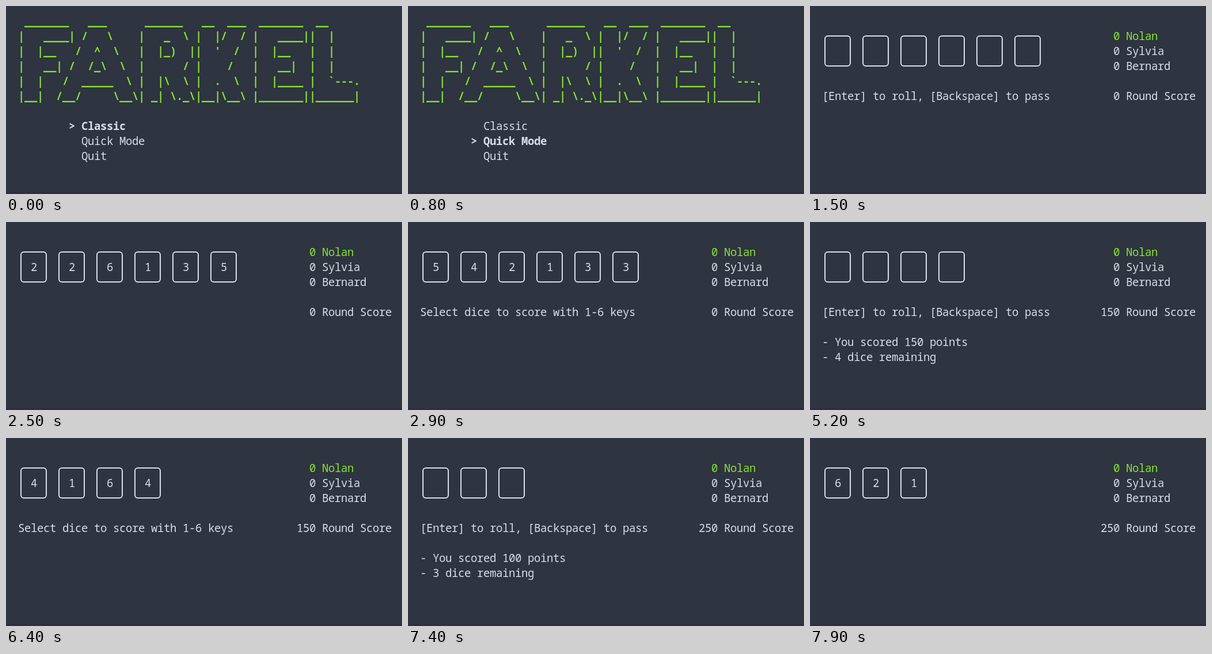
Animation of 688 by 326 pixels, one loop 8 s. Source, as an HTML page:

```html
<!DOCTYPE html>
<html lang="en">
<head>
<meta charset="utf-8">
<title>Farkel</title>
<style>
  html, body { margin: 0; width: 100%; height: 100%; overflow: hidden; background: #2e3440; }
  svg { display: block; }
  text {
    font: 19px "Noto Sans Mono", "DejaVu Sans Mono", monospace;
    fill: #d8dee9;
    white-space: pre;
  }
  rect.die { fill: none; stroke: #d8dee9; stroke-width: 2; }
  text.bold, text.logo { font-weight: 700; }
  text.logo, text.on { fill: #8ae234; }
  rect.on { stroke: #8ae234; }
</style>
</head>
<body>
<svg width="688" height="326" viewBox="0 0 688 326">
  <rect y="322" width="688" height="4" fill="#342d3d"/>
  <g id="menu"></g>
  <g id="game"></g>
</svg>
<script>
const LOOP = 8000, COL = 11, ROW = 26, LEFT = 21, BASE = 33;
const ROLL = 'Select dice to score with 1-6 keys';
const ENTER = '[Enter] to roll, [Backspace] to pass';
const players = ['Nolan', 'Sylvia', 'Bernard'];
const menuItems = ['Classic', 'Quick Mode', 'Quit'];
const logo = [
  ' _______   ___      ______   __  ___  _______  __',
  '|   ____| /   \\    |   _  \\ |  |/  / |   ____||  |',
  '|  |__   /  ^  \\   |  |_)  ||  \'  /  |  |__   |  |',
  '|   __| /  /_\\  \\  |      / |    /   |   __|  |  |',
  '|  |   /  _____  \\ |  |\\  \\ |  .  \\  |  |____ |  `---.',
  '|__|  /__/     \\__\\| _| \\._\\|__|\\__\\ |_______||______|'
];

// roll: number of dice tumbling; dice: settled faces; held: selected dice
const scenes = [
  { at: 0, pick: 0 },
  { at: 800, pick: 1 },
  { at: 1500, dice: '      ', ask: ENTER, score: 0 },
  { at: 2500, roll: 6, score: 0 },
  { at: 2900, dice: '542133', ask: ROLL, score: 0 },
  { at: 4100, dice: '542133', held: [0], ask: ROLL, score: 0 },
  { at: 4600, dice: '542133', held: [0, 3], ask: ROLL, score: 0 },
  { at: 5200, dice: '    ', ask: ENTER, score: 150, won: 150 },
  { at: 6000, roll: 4, score: 150 },
  { at: 6400, dice: '4164', ask: ROLL, score: 150 },
  { at: 7100, dice: '4164', held: [1], ask: ROLL, score: 150 },
  { at: 7400, dice: '   ', ask: ENTER, score: 250, won: 100 },
  { at: 7800, roll: 3, score: 250 },
  { at: 7900, dice: '621', score: 250 }
];

const menu = document.getElementById('menu');
const game = document.getElementById('game');

function add(parent, tag, attrs) {
  const el = document.createElementNS('http://www.w3.org/2000/svg', tag);
  for (const key in attrs) el.setAttribute(key, attrs[key]);
  parent.appendChild(el);
  return el;
}

// One character per terminal cell
function write(parent, col, row, str, cls = '') {
  const x = Array.from(str, (_, i) => LEFT + (col + i) * COL).join(' ');
  add(parent, 'text', { x, y: BASE + row * ROW, class: cls }).textContent = str;
}

function face(step, i) {
  const n = Math.sin(step * 12.9898 + i * 78.233) * 43758.5453;
  return String(1 + Math.floor((n - Math.floor(n)) * 6));
}

function drawMenu(pick) {
  logo.forEach((line, row) => write(menu, 0, row, line, 'logo'));
  write(menu, 8, 7 + pick, '>', 'bold');
  menuItems.forEach((name, i) => write(menu, 10, 7 + i, name, i === pick ? 'bold' : ''));
}

function drawDie(i, value, cls) {
  add(game, 'rect', { class: 'die ' + cls, x: 26 + i * 6 * COL, y: 52, width: 44, height: 52, rx: 5 });
  if (value !== ' ') write(game, 2 + i * 6, 2, value, cls);
}

function drawGame(scene, step) {
  const { roll, held = [], ask, score, won } = scene;
  const dice = roll ? Array.from({ length: roll }, (_, i) => face(step, i)) : [...scene.dice];
  dice.forEach((value, i) => drawDie(i, value, held.includes(i) ? 'on' : ''));
  players.forEach((name, i) => write(game, 46, 1 + i, '0 ' + name, i ? '' : 'on'));
  const total = String(score);
  write(game, 47 - total.length, 5, total + ' Round Score');
  if (ask) write(game, 0, 5, ask);
  if (won) {
    write(game, 0, 7, `- You scored ${won} points`);
    write(game, 0, 8, `- ${dice.length} dice remaining`);
  }
}

let shown = '';
function render(t) {
  const index = scenes.findLastIndex(s => s.at <= t);
  const scene = scenes[index];
  const step = scene.roll ? Math.floor(t / 100) : 0;
  const key = index + ':' + step;
  if (key === shown) return;
  shown = key;
  menu.replaceChildren();
  game.replaceChildren();
  if ('pick' in scene) drawMenu(scene.pick);
  else drawGame(scene, step);
}

const start = performance.now();
function tick() {
  render((performance.now() - start) % LOOP);
  requestAnimationFrame(tick);
}
tick();
</script>
</body>
</html>
```
